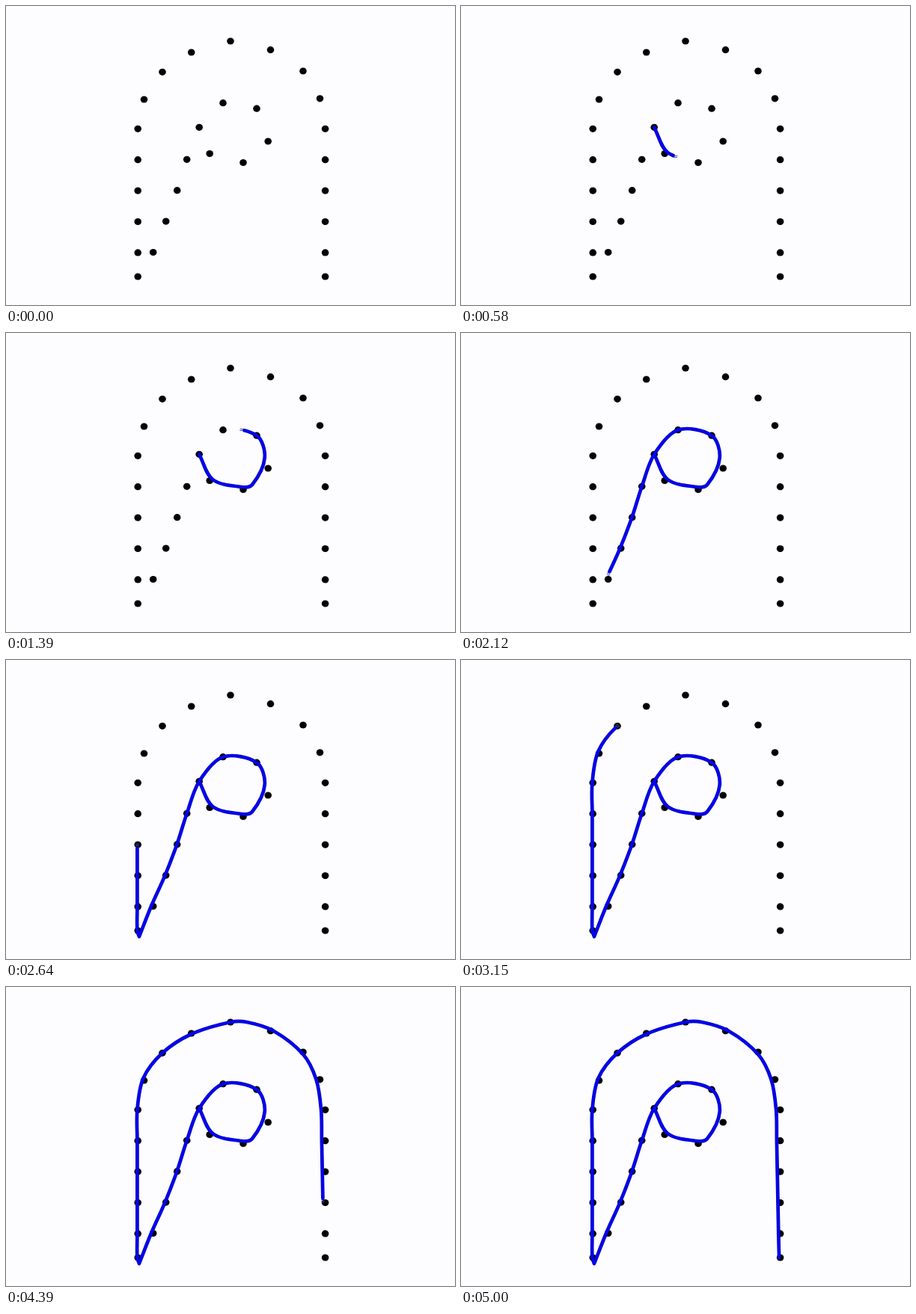
Recreate the animation shown at these times as an HTML page. Size 600 by 400 pixels, loop 5.03 s.

```html
<!DOCTYPE html>
<html lang="en">
<head>
<meta charset="utf-8">
<title>Connect the dots</title>
<style>
  html, body { margin: 0; width: 100%; height: 100%; overflow: hidden; background: #fdfcff; }
  svg { display: block; width: 100%; height: 100%; }
  path { fill: none; stroke-linejoin: round; }
  .line { stroke-linecap: round; }
</style>
</head>
<body>
<svg viewBox="0 0 600 400">
  <defs>
    <pattern id="rows" width="600" height="2" patternUnits="userSpaceOnUse">
      <rect width="600" height="1" fill="#fff"/>
    </pattern>
    <mask id="comb" maskUnits="userSpaceOnUse" x="0" y="0" width="600" height="400">
      <rect width="600" height="400" fill="url(#rows)"/>
    </mask>
  </defs>
  <g id="dots" fill="#020204"></g>
  <g id="pen">
    <g mask="url(#comb)"><path class="tip" stroke="#4646c4" stroke-width="4.4"/></g>
    <path class="line" stroke="#0404b4" stroke-width="4.7"/>
    <path class="line" stroke="#0404ee" stroke-width="3.4"/>
  </g>
</svg>
<script>
const LOOP = 5030, START = 270, TURN = 1390;
const SLOW = 0.17, FAST = 0.333, TIP = 6;
const dots = document.getElementById('dots'), pen = document.getElementById('pen');
const line = [...pen.querySelectorAll('.line')], tip = pen.querySelector('.tip');

// Draws a dot and returns where the pen passes it
function spot(x, y, dx = 0, dy = 0) {
  const e = document.createElementNS('http://www.w3.org/2000/svg', 'ellipse');
  const attrs = { cx: x, cy: y, rx: 4.8, ry: 4.6 };
  for (const k in attrs) e.setAttribute(k, attrs[k]);
  dots.append(e);
  return [x + dx, y + dy];
}

const GAP = 41.4;
const row = (n, make) => Array.from({ length: n }, (_, i) => make(i));
const side = (x, drift) => row(6, i => spot(x, Math.min(164.3 + GAP * i, 362), drift(i)));

const start = spot(258.2, 162.3), foot = [178, 370];
const loop = [
  start, spot(272.2, 197.5, 4, -1.5), spot(317, 209.5, -2, -3.5), [329, 203],
  spot(350.2, 181, -4.5, -14), spot(335, 137.2), spot(290, 129.7), start
];
const leg = row(4, i => spot(241.7 - 12 * i - i * i, 205.3 + GAP * i, -0.3 * i * i));
const left = side(176.2, () => -0.8).reverse();
const arch = [
  spot(184.5, 125, -1, -3), spot(209, 88.3), spot(247.7, 62, 0, 1), spot(300, 47), [322, 47],
  spot(353.5, 58.7, 4), spot(397, 87, 0, 3), spot(419.5, 123.8, -5)
];
const right = side(426.6, i => 0.8 * i - 5.5);

// Smooth curve through the points, as cubic segments
const dist = (a, b) => Math.hypot(b[0] - a[0], b[1] - a[1]);

function curve(list) {
  const slope = list.map((b, i) => {
    const a = list[i - 1] || b, c = list[i + 1] || b, span = dist(a, b) + dist(b, c);
    return [(c[0] - a[0]) / span, (c[1] - a[1]) / span];
  });
  const handle = (i, k) => list[i].map((v, n) => v + slope[i][n] * k);
  return list.slice(1).map((p, i) => {
    const k = dist(list[i], p) / 3;
    return `C${[handle(i, k), handle(i + 1, -k), p].join(' ')}`;
  }).join('');
}

const d = `M${start}` + curve([...loop, ...leg, foot]) + curve([foot, ...left, ...arch, ...right]);
for (const p of [...line, tip]) p.setAttribute('d', d);
const total = tip.getTotalLength();

// The pen moves slowly round the loop, then at a steady faster pace
function drawn(ms) {
  return SLOW * (Math.min(ms, TURN) - START) + FAST * Math.max(0, ms - TURN);
}

function render(ms) {
  const len = drawn(ms), done = len >= total;
  const solid = done ? total + 1 : Math.max(0.1, len - TIP);
  pen.style.display = ms < START ? 'none' : '';
  tip.style.display = done ? 'none' : '';
  for (const p of line) p.setAttribute('stroke-dasharray', `${solid} 9999`);
  tip.setAttribute('stroke-dasharray', `0 ${solid} ${TIP} 9999`);
}

const begin = performance.now();
function frame() {
  render((performance.now() - begin) % LOOP);
  requestAnimationFrame(frame);
}
render(0);
requestAnimationFrame(frame);
</script>
</body>
</html>
```
